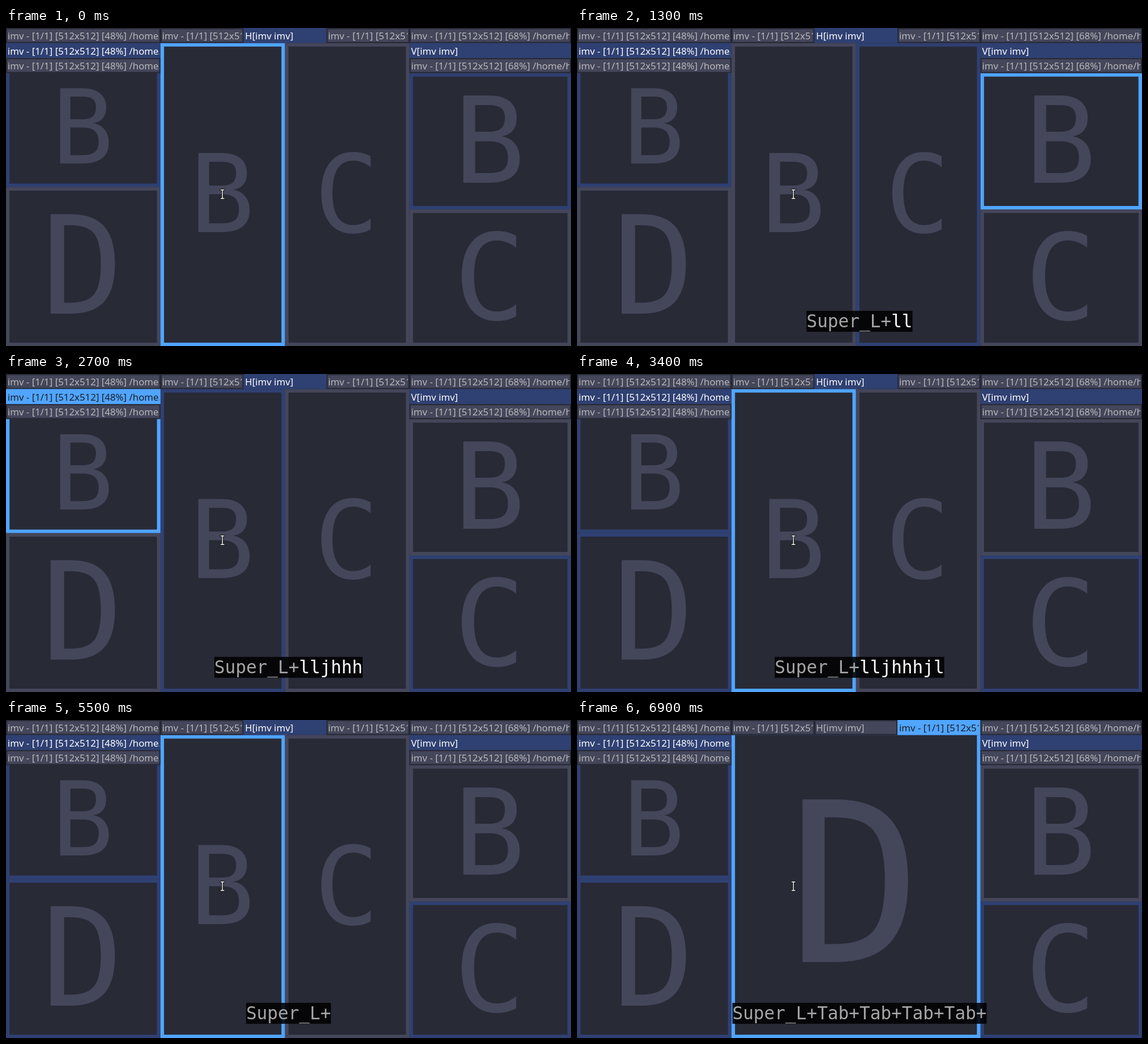
Recreate the animation shown at these times as an HTML page with a canvas. Size 998 by 561 pixels, loop 8000 ms.

```html
<!DOCTYPE html>
<html>
<head>
<meta charset="utf-8">
<style>
html, body { margin: 0; width: 100%; height: 100%; overflow: hidden; background: #282a36; }
canvas { display: block; }
</style>
</head>
<body>
<canvas id="stage" width="998" height="561"></canvas>
<script>
const ctx = document.getElementById('stage').getContext('2d');
const LOOP = 8000;
const DARK = '#282a36', GRAY = '#44465a', BLUE = '#2f4072', BRIGHT = '#50a5ff';
const MONO = '"DejaVu Sans Mono", monospace';

// Layout in pixels of a 1920 x 1080 desktop, scaled down to the stage.
const W = 1920, H = 1080, BORDER = 12, BAR = 51;
const COL1 = 525, COL2 = 1371, MID = 948, ROW = 616;
ctx.scale(998 / W, 998 / W);

// [time, modifier text, typed letters, focused pane]
const steps = [
  [0, '', '', 'midB'],
  [500, 'Super_L+', '', 'midB'],
  [800, 'Super_L+', 'l', 'midC'],
  [1200, 'Super_L+', 'll', 'rightB'],
  [1700, 'Super_L+', 'llj', 'rightC'],
  [2100, 'Super_L+', 'lljh', 'midC'],
  [2400, 'Super_L+', 'lljhh', 'midB'],
  [2700, 'Super_L+', 'lljhhh', 'leftB'],
  [3000, 'Super_L+', 'lljhhhj', 'leftD'],
  [3300, 'Super_L+', 'lljhhhjl', 'midB'],
  [4700, '', '', 'midB'],
  [5500, 'Super_L+', '', 'midB'],
  [5800, 'Super_L+Tab+', '', 'tabD'],
  [6100, 'Super_L+Tab+Tab+', '', 'tabA'],
  [6500, 'Super_L+Tab+Tab+Tab+', '', 'midB'],
  [6800, 'Super_L+Tab+Tab+Tab+Tab+', '', 'tabD'],
];

function box(x, y, w, h, color) {
  ctx.fillStyle = color;
  ctx.fillRect(x, y, w, h);
}

function pane(letter, left, top, right, bottom, color, hasTop = true) {
  box(left, top, right - left, bottom - top, color);
  const x = left + BORDER, y = top + (hasTop ? BORDER : 0);
  const w = right - BORDER - x, h = bottom - BORDER - y;
  box(x, y, w, h, DARK);
  const size = Math.min(w, h);
  ctx.font = `${size * 0.922}px ${MONO}`;
  ctx.textAlign = 'center';
  ctx.fillStyle = GRAY;
  ctx.fillText(letter, x + w / 2 - size * 0.005, y + h / 2 + size * 0.319);
}

function title(text, left, row, right, color) {
  const y = row * BAR, w = right - left;
  box(left, y, w, BAR, color === GRAY ? DARK : color);
  if (color === GRAY) box(left + 4, y + 4, w - 8, BAR - 8, GRAY);
  ctx.save();
  ctx.beginPath();
  ctx.rect(left + 4, y, w - 9, BAR);
  ctx.clip();
  ctx.font = '32.4px "Noto Sans", sans-serif';
  ctx.textAlign = 'left';
  ctx.fillStyle = { [GRAY]: '#b8b8bb', [BLUE]: '#fff', [BRIGHT]: '#1c1e28' }[color];
  ctx.fillText(text, left + 5.5, y + 38.5);
  ctx.restore();
}

function keys(mods, typed) {
  if (!mods) return;
  ctx.font = `59.8px ${MONO}`;
  ctx.textAlign = 'left';
  const modsWidth = ctx.measureText(mods).width;
  const width = modsWidth + ctx.measureText(typed).width;
  const x = (W - width) / 2;
  box(x, 960, width, 71, 'rgba(0,0,0,.86)');
  ctx.fillStyle = '#a6a6a6';
  ctx.fillText(mods, x, 1016);
  ctx.fillStyle = '#fff';
  ctx.fillText(typed, x + modsWidth, 1016);
}

function pointer() {
  const beam = (grow, color) => {
    const bar = (x, y, w, h) => box(x - grow, y - grow, w + 2 * grow, h + 2 * grow, color);
    bar(734, 548, 3, 32);
    for (const y of [548, 577]) bar(729, y, 13, 3);
  };
  beam(2, '#111');
  beam(0, '#eee');
}

function draw(t) {
  const past = steps.filter(s => s[0] <= t);
  const [, mods, typed, focus] = past[past.length - 1];

  // Each column remembers the pane that had focus last.
  const last = { left: 'leftB', right: 'rightB' };
  for (const s of past) last[s[3].match(/^[a-z]+/)[0]] = s[3];
  const shade = name =>
    name === focus ? BRIGHT :
    name === 'leftB' || Object.values(last).includes(name) ? BLUE : GRAY;

  box(0, 0, W, H, DARK);

  pane('B', 0, 150, COL1, H / 2, shade('leftB'), false);
  pane('D', 0, H / 2, COL1, H, shade('leftD'));
  pane('B', COL2, 3 * BAR, W, ROW, shade('rightB'));
  pane('C', COL2, ROW, W, H, shade('rightC'));

  const tabbed = focus.startsWith('tab');
  if (tabbed) {
    pane(focus[3], COL1, BAR, COL2, H, BRIGHT, false);
  } else {
    pane('B', COL1, BAR, MID, H, shade('midB'));
    pane('C', MID, BAR, COL2, H, shade('midC'));
  }

  const image = percent => `imv - [1/1] [512x512] [${percent}%] /home/h`;
  title(image(48), 0, 0, COL1, GRAY);
  title(image(48), 0, 1, COL1, shade('leftB'));
  title(image(48), 0, 2, COL1, GRAY);

  const tab = (COL2 - COL1) / 3;
  title(image(48), COL1, 0, COL1 + tab, focus === 'tabA' ? BRIGHT : GRAY);
  title('H[imv imv]', COL1 + tab, 0, COL2 - tab, tabbed ? GRAY : BLUE);
  title(image(48), COL2 - tab, 0, COL2, focus === 'tabD' ? BRIGHT : GRAY);

  title(image(68), COL2, 0, W, GRAY);
  title('V[imv imv]', COL2, 1, W, BLUE);
  title(image(68), COL2, 2, W, GRAY);

  keys(mods, typed);
  pointer();
}

function tick() {
  draw(performance.now() % LOOP);
  requestAnimationFrame(tick);
}
tick();
</script>
</body>
</html>
```
